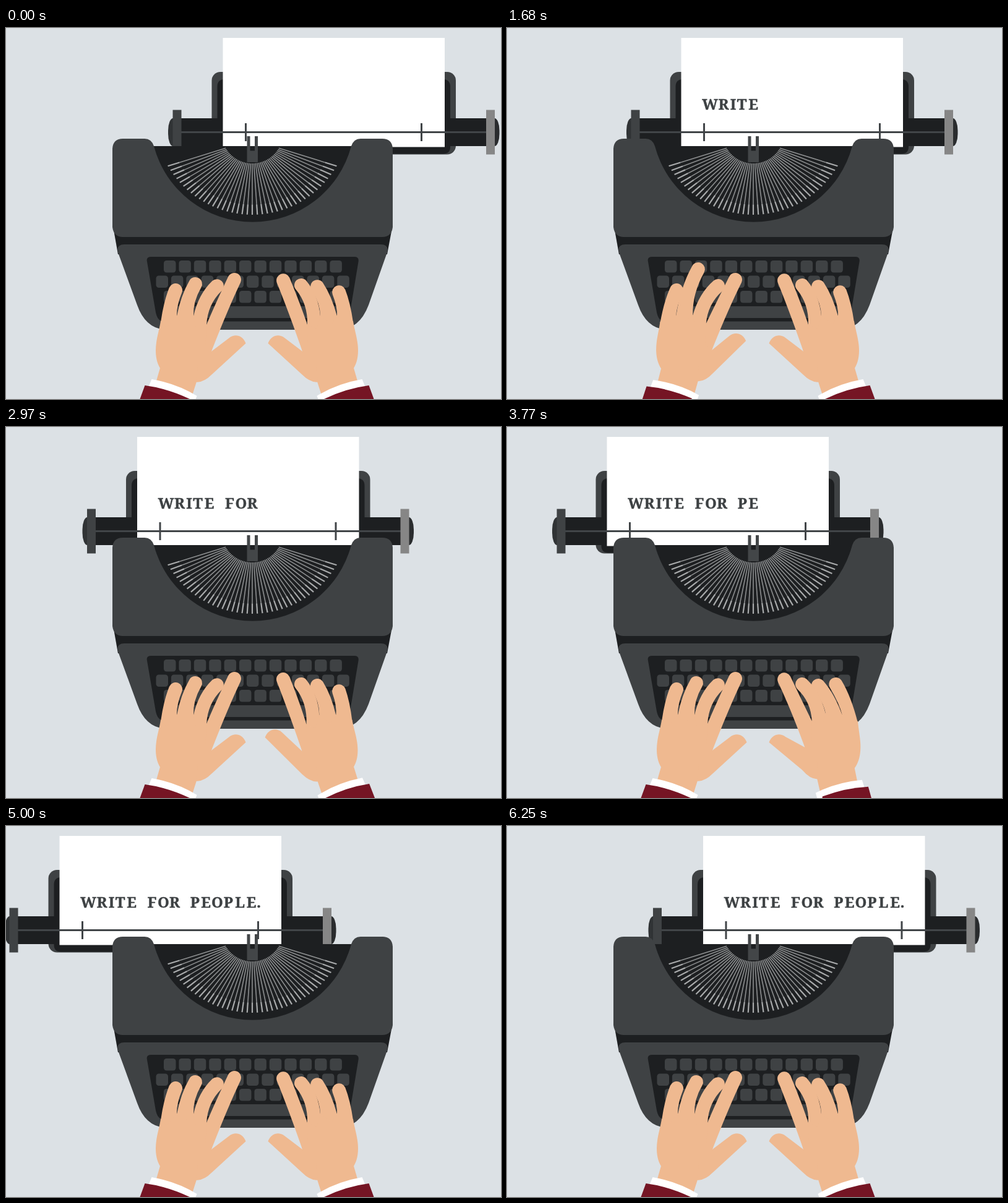
Recreate the animation shown at these times as an HTML page. Size 800x600 px, loop 6300 ms.

```html
<!DOCTYPE html>
<html lang="en">
<head>
<meta charset="utf-8">
<title>Typewriter</title>
<style>
  html, body { margin: 0; width: 100%; height: 100%; overflow: hidden; background: #dce1e5; }
  svg { display: block; width: 100vw; height: 100vh; }
  text { font: bold 24px "Noto Serif", serif; fill: #3d4143; stroke: #3d4143; stroke-width: .4; text-anchor: middle; }
  .grey { fill: #3f4244; }
  .black { fill: #1d1f21; }
  .skin { fill: #efb990; }
  .bar { stroke: #414548; stroke-width: 3; fill: none; }
</style>
</head>
<body>
<svg viewBox="0 0 800 600">
  <g id="carriage">
    <rect class="grey" x="332.500" y="71" width="394.500" height="133.500" rx="14"/>
    <path class="black" d="M341.500 95Q341.500 83 353 83H706Q718 83 718 95V192Q718 203.500 706 203.500H353Q341.500 203.500 341.500 192Z"/>
    <rect x="262" y="146" width="20" height="45" rx="8" ry="20" fill="#303335"/>
    <rect x="777" y="146" width="20.500" height="45" rx="8" ry="20" fill="#2a2c2e"/>
    <rect class="black" x="280" y="146" width="500" height="45"/>
    <rect x="350.500" y="16" width="358.500" height="176.500" fill="#fff"/>
    <path class="bar" d="M283 168.500H777M387.500 154V183M671.500 154V183"/>
    <rect class="grey" x="269.500" y="132.500" width="14" height="72"/>
    <rect x="776" y="132.500" width="14" height="72" fill="#868686"/>
    <g id="letters"></g>
  </g>

  <rect class="black" x="232" y="191" width="334" height="130"/>
  <path class="black" d="M172.500 318H625L616 366H181Z"/>
  <path class="grey" d="M172 195Q173 179 189 179H224Q235 179 239 191A165 165 0 0 0 558 191Q562 179 573 179H608Q624 179 625 195V322Q623 338 608 338H189Q174 338 172 322Z"/>
  <path class="grey" d="M181 363Q178 350 191 350H606Q619 350 616 363L586 448Q571 488 536 488H261Q226 488 212 448Z"/>
  <path class="black" d="M235 370H563Q571 370 569.500 378L556 460Q553 474.500 543 474.500H255Q245 474.500 242 460L228 378Q226 370 235 370Z"/>
  <rect class="grey" x="260" y="450" width="278" height="19" rx="4"/>
  <g id="keys"></g>
  <g id="wires"></g>
  <path d="M389.500 175H394.500V198.500H402V175H407V217H389.500Z" fill="#434648"/>
  <g id="left"></g>
  <g id="right" transform="matrix(-1 0 0 1 811 0)"></g>
</svg>
<script>
const LOOP = 6300, FRAME = 50, PRINT_X = 398, END = -264;
const $ = id => document.getElementById(id);

// char, start, paper x, hand, finger (4 = thumb), tip shift x/y, palm turn
const strokes = [
  ["W", 580, 397, "left", 0, 3, -18, -.03],
  ["R", 830, 419, "left", 3, 12, -17, .1],
  ["I", 1080, 434.5, "right", 1, 2, -18, -.03],
  ["T", 1330, 448.5, "left", 3, 15, -20, .1],
  ["E", 1580, 467, "left", 1, 3, -24, -.034],
  ["", 1890, 467, "right", 4, 14, -23, .06],
  ["F", 2040, 500, "left", 3, 6, -6, .05],
  ["O", 2290, 518.5, "right", 0, 9, -15, -.11],
  ["R", 2540, 536.5, "left", 3, 12, -17, .1],
  ["", 2970, 536.5, "right", 4, 14, -23, .06],
  ["P", 3220, 569.5, "right", 0, 6, -18, -.11],
  ["E", 3470, 587, "left", 1, 3, -24, -.034],
  ["O", 3720, 605.5, "right", 0, 9, -15, -.11],
  ["P", 3970, 623.5, "right", 0, 6, -18, -.11],
  ["L", 4280, 642, "right", 1, 2, -8, .03],
  ["E", 4530, 660.5, "left", 1, 3, -24, -.034],
  [".", 4900, 672.5, "right", 2, 0, 14, .06],
].map(([char, start, x, hand, finger, dx, dy, turn]) =>
  ({ char, start, x, hand, finger, dx, dy, turn,
     steps: char === "." ? [.5, 1] : [.35, .75, 1, .42] }));

const tips = {
  left: [[274, 424], [306, 414], [341, 417], [369, 407]],
  right: [[273, 427], [308, 418], [334, 416], [363, 408]],
};
const bases = [
  [[250, 476], [276, 466]],
  [[276, 466], [303, 466]],
  [[303, 466], [324, 480]],
  [[324, 480], [332, 523]],
];
const bends = [.15, .22, .35, .03];
const PIVOT = [270, 548], TIP_R = 11;

$("letters").innerHTML = strokes.map(s => `<text x="${s.x}" y="132">${s.char}</text>`).join("");

$("keys").innerHTML = [[255, 376, 12], [242.5, 400.5, 13], [255, 425, 12]].map(([x, y, n]) =>
  Array.from({ length: n }, (_, i) =>
    `<rect class="grey" x="${x + i * 24.4}" y="${y}" width="19.500" height="19.500" rx="4.500"/>`).join("")).join("");

$("wires").innerHTML = Array.from({ length: 41 }, (_, i) => {
  const a = (i - 20) * 3 * Math.PI / 180, sin = Math.sin(a), cos = Math.cos(a);
  const inner = [PRINT_X + 49.5 * sin, 169.5 + 49.5 * cos];
  const outer = [PRINT_X + 157.5 * sin, 144.5 + 157.5 * cos];
  const neck = inner.map((v, k) => v + (outer[k] - v) * .8);
  return `<path d="M${inner}L${neck}" stroke="#8d8f90" stroke-width="1.600"/>` +
    `<path d="M${neck}L${outer}" stroke="#a9abac" stroke-width="2.200"/>`;
}).join("");

for (const side of ["left", "right"]) {
  $(side).innerHTML = `<g class="palm">
    <path class="skin" d="M250 474C247 492 242 505 242 522C242 536 246 545 249 550L242 574L236 592L301 594L308 572L322 565L345 538L332 523L336 500L324 479L303 465L276 465Z"/>
    <path d="M235.500 568Q276 575 308.500 595L302 612L228 586Z" fill="#fff"/>
    <path d="M224.500 578Q262 583 297 600V645H200Z" fill="#751524"/>
    </g>` + '<path class="skin digit"/>'.repeat(5);
}

const show = p => p.map(v => v.toFixed(2)).join(" ");

function rotate([x, y], turn) {
  const dx = x - PIVOT[0], dy = y - PIVOT[1], c = Math.cos(turn), s = Math.sin(turn);
  return [PIVOT[0] + dx * c - dy * s, PIVOT[1] + dx * s + dy * c];
}

function fingerPath(tip, a, b, bend) {
  const mid = [(a[0] + b[0]) / 2, (a[1] + b[1]) / 2];
  const dx = tip[0] - mid[0], dy = tip[1] - mid[1], len = Math.hypot(dx, dy);
  const angle = Math.atan2(dy, dx) + bend;
  const d = [Math.cos(angle), Math.sin(angle)];
  const at = (side, back) =>
    show([tip[0] - d[1] * side - d[0] * back, tip[1] + d[0] * side - d[1] * back]);
  const root = [mid[0] - dx / len * 14, mid[1] - dy / len * 14];
  return `M${show(a)}Q${at(-TIP_R, len * .5)} ${at(-TIP_R, 0)}` +
    `A${TIP_R} ${TIP_R} 0 0 1 ${at(TIP_R, 0)}Q${at(TIP_R, len * .5)} ${show(b)}L${show(root)}Z`;
}

function thumbPath(turn, follows, dx, dy) {
  const root = (x, y) => show(rotate([x, y], turn));
  const tip = (x, y) => {
    const p = follows ? rotate([x, y], turn) : [x, y];
    return show([p[0] + dx, p[1] + dy]);
  };
  return `M${root(310, 545)}L${root(332, 523)}L${tip(361, 501)}` +
    `C${tip(370, 494)} ${tip(383, 497)} ${tip(387.5, 510)}` +
    `L${root(333, 560)}Q${root(319, 574)} ${root(307, 572.5)}Z`;
}

function drawHand(side, t) {
  const shift = Array.from({ length: 5 }, () => [0, 0]);
  let turn = 0;
  for (const s of strokes) {
    const amount = s.hand === side && s.steps[Math.floor((t - s.start) / FRAME)] || 0;
    shift[s.finger][0] += s.dx * amount;
    shift[s.finger][1] += s.dy * amount;
    turn += s.turn * amount;
  }
  const hand = $(side), digits = hand.querySelectorAll(".digit");
  hand.querySelector(".palm").setAttribute("transform", `rotate(${turn * 180 / Math.PI} ${PIVOT})`);
  tips[side].forEach(([x, y], i) => {
    const [a, b] = bases[i].map(p => rotate(p, turn));
    digits[i].setAttribute("d", fingerPath([x + shift[i][0], y + shift[i][1]], a, b, bends[i]));
  });
  digits[4].setAttribute("d", thumbPath(turn, side === "left", ...shift[4]));
}

function carriageOffset(t) {
  if (t >= 6050) return END * (1 - .1746 * (Math.floor((t - 6050) / FRAME) + 1));
  const typed = strokes.filter(s => t >= s.start + 2 * FRAME).pop();
  return typed ? Math.min(0, Math.max(END, PRINT_X - typed.x)) : 0;
}

function draw() {
  const t = performance.now() % LOOP;
  $("carriage").setAttribute("transform", `translate(${carriageOffset(t)} 0)`);
  [...$("letters").children].forEach((el, i) => {
    el.setAttribute("visibility", t >= strokes[i].start + 2 * FRAME ? "visible" : "hidden");
  });
  drawHand("left", t);
  drawHand("right", t);
  requestAnimationFrame(draw);
}
draw();
</script>
</body>
</html>
```
